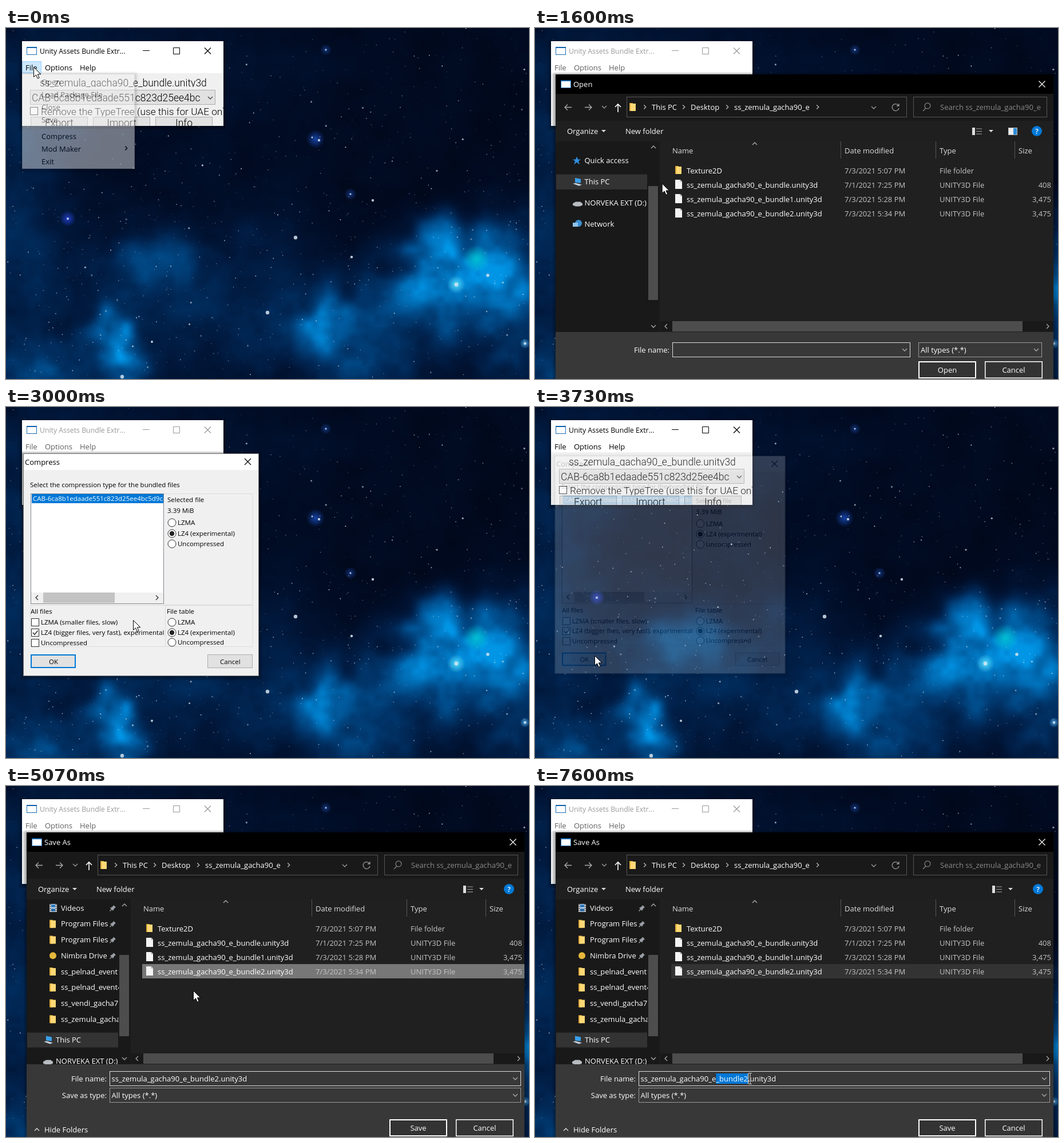
An HTML page with a canvas for the animation above (8000 ms loop, 914x613 px).

```html
<!DOCTYPE html>
<html lang="en">
<head>
<meta charset="utf-8">
<title>Compressing a bundle</title>
<style>
html, body { margin: 0; width: 100%; height: 100%; overflow: hidden; background: #020a1c; }
canvas, svg { position: absolute; left: 0; top: 0; width: 914px; height: 613px; }
text { font-family: "Open Sans", "Noto Sans", sans-serif; white-space: pre; }
.thin text { font-family: Roboto, "Liberation Sans", sans-serif; font-weight: 300; }
.off .cap { fill: #999; }
.off .bar { fill: #5f5f5f; }
.off .ctl { stroke: #999; }
#beam { mix-blend-mode: difference; }
</style>
</head>
<body>
<canvas id="sky" width="914" height="613"></canvas>
<svg id="stage" viewBox="0 0 914 613"></svg>
<script>
const LOOP = 8000, STEP = 200 / 3;
const $ = id => document.getElementById(id);
const clamp = v => Math.max(0, Math.min(1, v));
const ramp = (t, a, b) => clamp((t - a) / (b - a));
const within = (t, a, b) => t >= a && t < b;

// ---- Night sky ----
const ctx = $('sky').getContext('2d');

function random(seed) {
  return () => {
    seed = (seed + 0x6D2B79F5) | 0;
    let v = Math.imul(seed ^ (seed >>> 15), 1 | seed);
    v = (v + Math.imul(v ^ (v >>> 7), 61 | v)) ^ v;
    return ((v ^ (v >>> 14)) >>> 0) / 4294967296;
  };
}
function lattice(x, y) {
  const v = Math.sin(x * 127.1 + y * 311.7) * 43758.5453;
  return v - Math.floor(v);
}
function noise(x, y) {
  const ix = Math.floor(x), iy = Math.floor(y);
  let u = x - ix, v = y - iy;
  u *= u * (3 - 2 * u);
  v *= v * (3 - 2 * v);
  const a = lattice(ix, iy), b = lattice(ix + 1, iy);
  const c = lattice(ix, iy + 1), d = lattice(ix + 1, iy + 1);
  return a + (b - a) * u + (c - a + (a - b - c + d) * u) * v;
}
const cloud = (x, y) => noise(x / 60, y / 60) * .55 + noise(x / 26, y / 26) * .28 + noise(x / 11, y / 11) * .17;

// x, y, radius x, radius y, strength
const clouds = [
  [800, 440, 75, 52, .72], [752, 370, 24, 30, .34], [865, 405, 58, 42, .4], [715, 465, 42, 34, .28],
  [890, 470, 55, 40, .28], [570, 520, 46, 36, .62], [185, 545, 26, 32, .7], [205, 590, 24, 26, .35],
  [245, 405, 50, 36, .26], [40, 595, 70, 36, .36], [340, 480, 170, 110, .2], [0, 330, 70, 230, .2],
  [640, 565, 120, 60, .22], [895, 580, 45, 40, .25], [180, 60, 260, 110, .07]
];

function glow(x, y, r, rgb, alpha) {
  const g = ctx.createRadialGradient(x, y, 0, x, y, r);
  g.addColorStop(0, `rgba(${rgb},${alpha})`);
  g.addColorStop(1, `rgba(${rgb},0)`);
  ctx.fillStyle = g;
  ctx.fillRect(x - r, y - r, 2 * r, 2 * r);
}
function dot(x, y, r, alpha) {
  ctx.fillStyle = `rgba(215,228,240,${alpha})`;
  ctx.beginPath();
  ctx.arc(x, y, r, 0, 7);
  ctx.fill();
}
function paintSky() {
  const w = 457, h = 307, small = document.createElement('canvas');
  small.width = w;
  small.height = h;
  const sc = small.getContext('2d'), img = sc.createImageData(w, h);
  for (let j = 0, k = 0; j < h; j++) for (let i = 0; i < w; i++, k += 4) {
    const x = i * 2, y = j * 2, n = cloud(x, y);
    const wx = x + (noise(x / 35 + 9, y / 35) - .5) * 46, wy = y + (noise(x / 35, y / 35 + 7) - .5) * 46;
    let v = .05;
    for (const [cx, cy, rx, ry, s] of clouds) {
      const d = ((wx - cx) / rx) ** 2 + ((wy - cy) / ry) ** 2;
      if (d < 10) v += s * Math.exp(-d / 2);
    }
    v = clamp(v * (.55 + .85 * n));
    img.data[k] = 1;
    img.data[k + 1] = 4 + 145 * v ** 1.1;
    img.data[k + 2] = 15 + 215 * v ** .88;
    img.data[k + 3] = 255;
  }
  sc.putImageData(img, 0, 0);
  ctx.drawImage(small, 0, 0, 914, 614);

  glow(822, 403, 24, '0,225,215', .65);
  glow(787, 448, 16, '90,225,255', .95);
  glow(108, 333, 14, '40,70,230', .8);
  glow(541, 194, 16, '30,90,220', .7);
  glow(602, 290, 11, '30,80,190', .6);
  glow(559, 38, 10, '30,80,180', .6);
  glow(907, 551, 9, '90,190,255', .8);
  const rnd = random(41);
  for (let i = 0; i < 950; i++) {
    const x = rnd() * 914, y = rnd() ** .8 * 613, m = rnd();
    dot(x, y, .4 + .65 * m * m + (m > .975 ? .6 : 0), .3 + .6 * rnd());
  }
  for (const [x, y, r] of [[108, 333, 2], [547, 196, 2.2], [535, 191, 1.5], [787, 448, 3.4], [842, 432, 2.8],
    [506, 366, 3.2], [457, 497, 3.2], [203, 609, 3.2], [907, 551, 2.2], [559, 38, 1.5], [602, 290, 1.6],
    [641, 301, 2.2], [255, 548, 2], [604, 400, 2.3]]) dot(x, y, r, .85);
}

// ---- Drawing helpers ----
const rect = (x, y, w, h, fill, extra = '') => `<rect x="${x}" y="${y}" width="${w}" height="${h}" fill="${fill}" ${extra}/>`;
const box = (x, y, w, h, fill, edge, sw = 1) =>
  rect(x + sw / 2, y + sw / 2, w - sw, h - sw, fill, `stroke="${edge}" stroke-width="${sw}"`);
const text = (x, y, s, fill = '#fff', size = 13, extra = '') =>
  `<text x="${x}" y="${y + size * .355}" font-size="${size}" fill="${fill}" ${extra}>${s}</text>`;
const line = (d, color, w = 1, extra = '') => `<path d="${d}" fill="none" stroke="${color}" stroke-width="${w}" ${extra}/>`;
const disc = (x, y, r, fill, extra = '') => `<circle cx="${x}" cy="${y}" r="${r}" fill="${fill}" ${extra}/>`;
const group = (id, s, extra = '') => `<g id="${id}" ${extra}>${s}</g>`;
const mid = 'text-anchor="middle"', end = 'text-anchor="end"';
const cross = (x, y, r, color, extra) => line(`M${x - r} ${y - r}l${2 * r} ${2 * r}m0 ${-2 * r}l${-2 * r} ${2 * r}`, color, 1.2, extra);
const turns = { right: 0, down: 90, left: 180, up: 270 };
const chevron = (x, y, dir, color = '#aaa', r = 4) =>
  line(`M${-r / 2} ${-r}L${r / 2} 0L${-r / 2} ${r}`, color, 1.3, `transform="translate(${x} ${y}) rotate(${turns[dir]})"`);
const triangle = (x, y, color = '#ddd') => `<path d="M${x - 4} ${y - 2}h8l-4 4z" fill="${color}"/>`;
const clip = (id, x, y, w, h, s) => `<clipPath id="${id}">${rect(x, y, w, h, '#000')}</clipPath><g clip-path="url(#${id})">${s}</g>`;
function shadow(x, y, w, h) {
  let s = '';
  for (let i = 1; i < 7; i++) s += rect(x - i, y - i + 2, w + 2 * i, h + 2 * i, '#000', 'opacity=".06" rx="4"');
  return s;
}
const appIcon = (x, y) => box(x, y, 18, 14, '#fff', '#1a6fb5') + rect(x, y, 18, 2, '#0d5fa8');

const icons = {
  folder: (x, y) => rect(x, y - 7, 6, 14, '#d9a93a') + rect(x + 2, y - 6, 9, 13, '#ffd976'),
  file: (x, y) => `<path d="M${x} ${y - 8}h9l3 3v13h-12z" fill="#f4f4f4"/>` + line(`M${x + 9} ${y - 8}v3h3`, '#999'),
  doc: (x, y) => rect(x, y - 7, 12, 14, '#e8eef5') + rect(x + 2, y - 4, 8, 3, '#3d86c6') + line(`M${x + 2} ${y + 1.5}h8m-8 3h8`, '#7a98b5'),
  picture: (x, y) => rect(x - 1, y - 6, 15, 12, '#eef6fc') + rect(x + 1, y - 4, 11, 5, '#4aa3e0') + rect(x + 1, y + 1, 11, 3, '#3b6d8c'),
  video: (x, y) => rect(x, y - 7, 13, 14, '#d5dbe3') + rect(x + 3, y - 6, 7, 5, '#2d7cc0') + rect(x + 3, y + 1, 7, 5, '#2d6ca5') +
    line(`M${x + 1.5} ${y - 7}v14m10-14v14`, '#333', 1.5, 'stroke-dasharray="2 1.5"'),
  cloud: (x, y) => disc(x + 6, y, 6, '#e5b83b'),
  star: (x, y) => `<path d="M${x + 7} ${y - 7}l2 5h5l-4 3 2 6-5-4-5 4 2-6-4-3h5z" fill="#2f8fe0"/>`,
  pc: (x, y) => `<path d="M${x + 4} ${y - 7}l10 2v7l-10-1z" fill="#3aa0ea"/><path d="M${x} ${y + 3}l5-1 11 3-5 2z" fill="#c9d3dc"/>`,
  disk: (x, y) => `<path d="M${x} ${y + 1}l5-3h8l4 3v3l-5 2h-7l-5-2z" fill="#b8bcc0"/>`,
  net: (x, y) => disc(x + 10, y - 1, 6, '#3c8fd0') + rect(x, y - 2, 9, 7, '#8fc3ea')
};
const pin = (x, y) => `<path d="M${x + 1} ${y - 5}l4 4-2 1-2 3-1 2-2-2-3 3-1-1 3-3-2-2 2-1 3-2z" fill="#9a9fa5"/>`;

// ---- Main window and its menu ----
const FOLDER = 'ss_zemula_gacha90_e', FILE = FOLDER + '_bundle2.unity3d';
const CAB = 'CAB-6ca8b1edaade551c823d25ee4bc';
const menuItems = [['Open', 94], ['Load Package File', 116], ['Close', 138], ['Save', 160], ['Compress', 189], ['Mod Maker', 211], ['Exit', 233]];

function mainWindow() {
  const button = (x, s) => box(x, 155, 100, 30, '#e1e1e1', '#adadad') + text(x + 50, 166, s, '#000', 17.5, mid);
  const cap = 'class="cap"', bar = 'class="bar"', ctl = 'class="ctl"';
  const body = rect(28, 23, 352, 148, '#f0f0f0') + rect(28, 23, 352, 56, '#fff') + appIcon(36, 33) +
    text(59, 40.5, 'Unity Assets Bundle Extr...', '#000', 12.3, cap) +
    line('M239 39.5h12', '#000', 1, ctl) + line('M292.5 34.5h11v11h-11z', '#000', 1, ctl) + cross(352.5, 40, 5.5, '#000', ctl) +
    group('fileHot', box(28, 58, 34, 21, '#cce8ff', '#99d1ff')) +
    text(34, 69, 'File', '#000', 13, bar) + text(68, 69, 'Options', '#000', 13, bar) + text(129, 69, 'Help', '#000', 13, bar) +
    `<g class="thin">` + clip('c1', 28, 80, 352, 23, text(59, 95.5, FILE.replace('2.', '.'), '#000', 17.5)) +
    box(42, 108, 324, 26, '#e1e1e1', '#adadad') + text(45, 122, CAB, '#000', 17.5) + chevron(357, 122, 'down', '#444') +
    box(42, 138, 14, 14, '#fff', '#333') + clip('c2', 28, 135, 352, 19, text(61, 146, 'Remove the TypeTree (use this for UAE on)', '#000', 17.3)) +
    button(43, 'Export') + button(152, 'Import') + button(261, 'Info') + '</g>';
  return shadow(28, 23, 352, 148) + clip('c0', 28, 23, 352, 148, body);
}
const menu = () => shadow(28, 80, 197, 166) + box(28, 80, 197, 166, '#f2f2f2', '#ccc') +
  rect(30, 0, 192, 23, '#91c9f7', 'id="menuHot"') + line('M60 174.5h160', '#d0d0d0') +
  menuItems.map(([s, y]) => text(62, y, s, '#000')).join('') + chevron(210, 210, 'right', '#000', 3.5);

// ---- File dialogs ----
const tree = [['doc', 'Documents'], ['picture', 'Pictures'], ['video', 'Videos'], ['folder', 'Program Files'], ['folder', 'Program Files'],
  ['cloud', 'Nimbra Drive'], ['folder', 'ss_pelnad_event1'], ['folder', 'ss_pelnad_event4'], ['folder', 'ss_vendi_gacha7'], ['folder', 'ss_zemula_gacha9']];
const rows = [['Texture2D', '7/3/2021 5:07 PM', 'File folder', ''], [FOLDER + '_bundle.unity3d', '7/1/2021 7:25 PM', 'UNITY3D File', '408'],
  [FOLDER + '_bundle1.unity3d', '7/3/2021 5:28 PM', 'UNITY3D File', '3,475'], [FILE, '7/3/2021 5:34 PM', 'UNITY3D File', '3,475']];

function sidebar(id, save, low) {
  const from = save ? 2 : 0, list = tree.slice(from), pcY = 213 + list.length * 27.75 + 8.6;
  const items = list.map(([icon, s], i) => {
    const y = 213 + i * 27.75, pinned = i + from < 6;
    return icons[icon](76, y) + clip(`${id}t${i}`, 90, y - 12, pinned ? 90 : 107, 24, text(96, y, s)) + (pinned ? pin(187, y) : '');
  }).join('') + rect(37, pcY - 13, 159, 26, '#333') + icons.pc(66, pcY) + text(87, pcY, 'This PC') +
    icons.disk(65, pcY + 37) + text(87, pcY + 37, 'NORVEKA EXT (D:)');
  const scroll = rect(198, save ? 295 : 276, 17, save ? 142 : 199, '#4d4d4d') + chevron(207, 208, 'up') + chevron(207, low - 10, 'down');
  const roots = [['star', 'Quick access', 231.6], ['pc', 'This PC', 268.7], ['disk', 'NORVEKA EXT (D:)', 305.5], ['net', 'Network', 342]];
  const closed = rect(37, 255.5, save ? 179 : 159, 26.5, '#333') +
    roots.map(([icon, s, y]) => icons[icon](66, y) + text(86.5, y, s)).join('');
  return clip(id + 'side', 36, 198, 181, low - 198,
    group(id + 'Tree', items + scroll) + group(id + 'Roots', closed + (save ? '' : scroll)));
}

function dialog(id, save) {
  const low = save ? 486 : 531, title = save ? 'Save As' : 'Open', dim = '#8a8a8a';
  let s = shadow(36, 81, 870, 560) + rect(36, 81, 870, 560, '#383838') + rect(36, 81, 870, 34, '#000') +
    rect(36, 115, 870, 47, '#191919') + rect(36, 162, 870, 36, '#1f1f1f') +
    rect(36, 198, 182, low - 198, '#191919') + rect(218, 198, 688, low - 198, '#202020');
  s += group(id + 'Head', appIcon(45, 91) + text(67, 98.5, title) + cross(886, 98, 5.5, '#fff')) +
    group(id + 'Bare', text(45, 98.5, title));
  s += line('M64 138.5h-12m5-5l-5 5l5 5', '#aaa', 1.3) + line('M87 138.5h12m-5-5l5 5l-5 5', '#aaa', 1.3) + chevron(121, 138, 'down', '#999') +
    line('M145 147v-14m-5 5l5-5l5 5', '#fff', 1.6) + box(160, 120, 490, 36, '#191919', '#555') + icons.folder(165, 138) +
    [192, 260, 336, 494].map(x => chevron(x, 138, 'right', '#bbb', 3.5)).join('') +
    text(204, 138.5, 'This PC') + text(272, 138.5, 'Desktop') + text(348, 138.5, FOLDER) + chevron(592, 139, 'down', '#999') +
    line('M635 135a6 6 0 1 0 1 5M636 132v4h-4', '#999', 1.3) + box(661, 120, 234, 36, '#191919', '#555') +
    line('M678 145l5-5m0 0a5 5 0 1 1 7-1a5 5 0 0 1-7 1', '#888', 1.2) +
    clip(id + 'find', 662, 121, 227, 34, text(708, 138.5, 'Search ' + FOLDER, dim));
  const vx = save ? 799 : 764;
  s += text(56, 180.5, 'Organize') + triangle(120, 180) + text(158, 180.5, 'New folder') +
    rect(vx, 174, 5, 13, '#ddd') + line(`M${vx + 7} 176h10m-10 4.500h10m-10 4.500h10`, '#aaa', 1.2) + triangle(save ? 831 : 797, 180) +
    (save ? '' : box(827, 174, 16, 13, '#eee', '#bbb') + rect(836, 175, 6, 11, '#2d8ad6')) +
    disc(save ? 879 : 877, 180, 9, '#0078d7') + text(save ? 879 : 877, 180.5, '?', '#fff', 12.5, mid + ' font-weight="600"');
  s += sidebar(id, save, low);
  s += line('M534.5 198v30m166-30v30m138-30v30', '#555') + chevron(384, 202, 'up', '#aaa', 4) +
    text(240, 214, 'Name', '#dedede') + text(541, 214, 'Date modified', '#dedede') + text(707, 214, 'Type', '#dedede') + text(845, 214, 'Size', '#dedede') +
    rect(238, 311, 668, 25, 'none', `id="${id}Row"`);
  rows.forEach(([name, date, type, size], i) => {
    const y = 249 + i * 25;
    s += icons[i ? 'file' : 'folder'](245, y - 1) + text(265, y, name) + text(541, y, date, '#c4c4c4') +
      text(707, y, type, '#c4c4c4') + text(902, y, size, '#c4c4c4', 13, end);
  });
  s += rect(219, low - 19, 687, 18, '#191919') + rect(240, low - 19, 612, 18, '#4d4d4d') +
    chevron(229, low - 10, 'left') + chevron(896, low - 10, 'right');
  const button = (x, label, sw) => box(x, 582, 101, 30, '#333', '#fff', sw) + text(x + 50.5, 597, label, '#fff', 13, mid);
  const field = (x, y, w, edge) => box(x, y, w, 26, '#383838', edge) + chevron(x + w - 10, y + 13, 'down', '#aaa');
  s += save
    ? text(176, 511, 'File name:', '#fff', 13, end) + field(181, 498, 719, '#ddd') + text(176, 540, 'Save as type:', '#fff', 13, end) +
      field(181, 527, 719, '#999') + text(184.5, 540, 'All types (*.*)') + chevron(54, 600, 'up', '#ddd') + text(67, 600.5, 'Hide Folders') +
      rect(0, 502, 0, 18, '#0078d7', 'id="sel"') + rect(190, 502, 1, 18, '#fff', 'id="caret"')
    : text(235, 562, 'File name:', '#fff', 13, end) + field(240, 549, 416, '#ddd') + field(670, 549, 216, '#999') + text(674, 562, 'All types (*.*)');
  s += group(id + 'Name', text(save ? 184.5 : 244, save ? 511 : 562, FILE)) + button(670, save ? 'Save' : 'Open', 2) + button(786, 'Cancel', 1.5);
  return s;
}

// ---- Compression dialog ----
function compressDialog() {
  const label = (x, y, s, fill = '#000') => text(x, y, s, fill, 11.5);
  const radio = (y, s, on) => disc(290, y, 7, '#fff', 'stroke="#333"') + (on ? disc(290, y, 4.2, '#222') : '') + label(300, y, s);
  const check = (y, s, on) => box(44, y - 7, 14, 14, '#fff', '#333') + (on ? line(`M47 ${y}l3 3.500l5.500-7`, '#222', 1.4) : '') + label(61, y, s);
  const kinds = ['LZMA', 'LZ4 (experimental)', 'Uncompressed'];
  const radios = ys => ys.map((y, i) => radio(y, kinds[i], i === 1)).join('');
  return shadow(30, 81, 412, 389) + box(30, 81, 412, 389, '#f0f0f0', '#777') + rect(31, 82, 410, 28, '#fff') +
    text(33, 96, 'Compress', '#000') + cross(422.5, 95.5, 5.5, '#000') + label(42, 136, 'Select the compression type for the bundled files') +
    line('M276 151.500h155v194h-155M43 346.500h388v72h-388zM278.500 346v72', '#dcdcdc') + box(43, 151, 233, 193, '#fff', '#828790') +
    rect(45, 152, 230, 16, '#0078d7') + clip('c4', 45, 152, 230, 16, label(47, 160, CAB + '5d9ce', '#fff')) +
    rect(44, 324, 231, 19, '#f0f0f0') + rect(65, 324, 125, 18, '#c3c3c3') + chevron(54, 333, 'left', '#333') + chevron(264, 333, 'right', '#333') +
    label(282, 162, 'Selected file') + label(282, 181, '3.39 MiB') + radios([202, 221, 239]) +
    label(43, 357, 'All files') + label(281, 357, 'File table') + radios([376, 394, 411]) +
    clip('c5', 42, 365, 234, 56, check(376, 'LZMA (smaller files, slow)') + check(394, 'LZ4 (bigger files, very fast), experimental', true) + check(412, 'Uncompressed')) +
    rect(44, 433, 77, 22, '#e1e1e1', 'id="ok" stroke="#0078d7" stroke-width="2"') + label(75, 444.5, 'OK') +
    box(352, 432, 79, 24, '#e1e1e1', '#adadad') + label(374, 444.5, 'Cancel');
}

$('stage').innerHTML = group('main', mainWindow()) + group('menu', menu()) +
  group('picked', rect(30, 177, 192, 23, '#91c9f7') + text(62, 189, 'Compress', '#000')) +
  group('open', dialog('open', false)) + group('comp', compressDialog()) + group('save', dialog('save', true)) +
  '<path id="arrow" d="M.5 .5v17l4-3.700l2.800 6.400l2.800-1.200l-2.800-6.200h5.500z" fill="#fff" stroke="#000"/>' +
  line('M-3 -9.500h2.500l.5 .5l.5-.5h2.500M0 -9v18M-3 9.500h2.500l.5-.5l.5 .5h2.500', '#fff', 1.2, 'id="beam"');

// ---- Motion ----
const path = [[0, 48, 68], [200, 48, 68], [730, 82, 190], [1330, 82, 190], [1790, 304, 319], [2690, 304, 319], [3000, 222, 372],
  [3330, 104, 434], [4400, 104, 434], [4530, 189, 372], [4670, 189, 372], [4930, 318, 322], [5000, 318, 322], [5066, 327, 357],
  [5730, 319, 511], [6470, 319, 511], [6800, 376, 511]];

function pointer(t) {
  const i = path.findIndex(p => p[0] > t);
  if (i < 0) return path[path.length - 1].slice(1);
  const [a, x, y] = path[i - 1], [b, u, v] = path[i];
  let p = ramp(t, a, b);
  p *= p * (3 - 2 * p);
  return [x + (u - x) * p, y + (v - y) * p];
}
const set = (id, name, v) => $(id).setAttribute(name, v);
const show = (id, on) => set(id, 'display', on ? 'inline' : 'none');
const fade = (id, o) => { show(id, o > 0); set(id, 'opacity', o); };

// Grow in while fading up, shrink slightly while fading out.
function pop(id, t, [inA, inB, outA, outB], cx, cy) {
  const p = ramp(t, inA, inB), q = ramp(t, outA, outB), s = .95 + .05 * p - .026 * q;
  fade(id, p * (1 - q));
  set(id, 'transform', `translate(${cx} ${cy}) scale(${s}) translate(${-cx} ${-cy})`);
}

ctx.font = '13px "Open Sans", "Noto Sans", sans-serif';
const at = n => 184.5 + ctx.measureText(FILE.slice(0, n)).width;

function selection(t) {
  if (t < 6195) return [0, 0];
  return t < 6525 ? [0, FILE.length] : [19, 19 + Math.round(8 * ramp(t, 6470, 6795))];
}

function draw(t) {
  const [x, y] = pointer(t);
  set('main', 'class', t < 1060 || within(t, 3660, 3770) ? '' : 'off');
  show('fileHot', t < 1060);
  fade('menu', t < 1060 ? Math.min(1, .45 + t / 240) : 0);
  const near = menuItems.reduce((a, b) => Math.abs(b[1] - y) < Math.abs(a[1] - y) ? b : a);
  show('menuHot', y > 82);
  set('menuHot', 'y', near[1] - 12);
  fade('picked', t < 1060 ? 0 : 1 - ramp(t, 1066, 1333));

  pop('open', t, [1200, 1466, 2200, 2375], 470.5, 330);
  show('openTree', t >= 1660);
  show('openRoots', t < 1660);
  show('openHead', t < 2200);
  show('openBare', t >= 2200);
  set('openRow', 'fill', t >= 2060 ? '#777' : t > 1720 ? '#4d4d4d' : 'none');
  show('openName', t >= 2060);

  pop('comp', t, [2330, 2530, 3550, 3775], 236, 275);
  set('ok', 'fill', t > 3450 ? '#cce4f7' : t > 3260 ? '#e5f1fb' : '#e1e1e1');

  pop('save', t, [3773, 4040, 9000, 9001], 470.5, 333);
  show('saveTree', t >= 4390);
  show('saveRoots', t < 4390);
  show('saveBare', false);
  set('saveRow', 'fill', t >= 5725 ? '#333' : t >= 5060 ? '#777' : t >= 4860 ? '#4d4d4d' : 'none');
  show('saveName', t >= 5060);
  const [a, b] = selection(t);
  set('sel', 'x', at(a));
  set('sel', 'width', at(b) - at(a));
  show('caret', t < 4465 || within(t, 4925, 5060) || within(t, 6525, 7060) || t >= 7595);
  set('caret', 'x', t < 5060 ? 190 : at(b));

  const typing = t > 5060 && y > 498;
  show('arrow', !typing);
  show('beam', typing);
  set(typing ? 'beam' : 'arrow', 'transform', `translate(${x} ${y})`);
}

paintSky();
const start = performance.now();
function frame() {
  const t = (performance.now() - start) % LOOP;
  draw(Math.floor((t + 4) / STEP) * STEP);
  requestAnimationFrame(frame);
}
frame();
</script>
</body>
</html>
```
